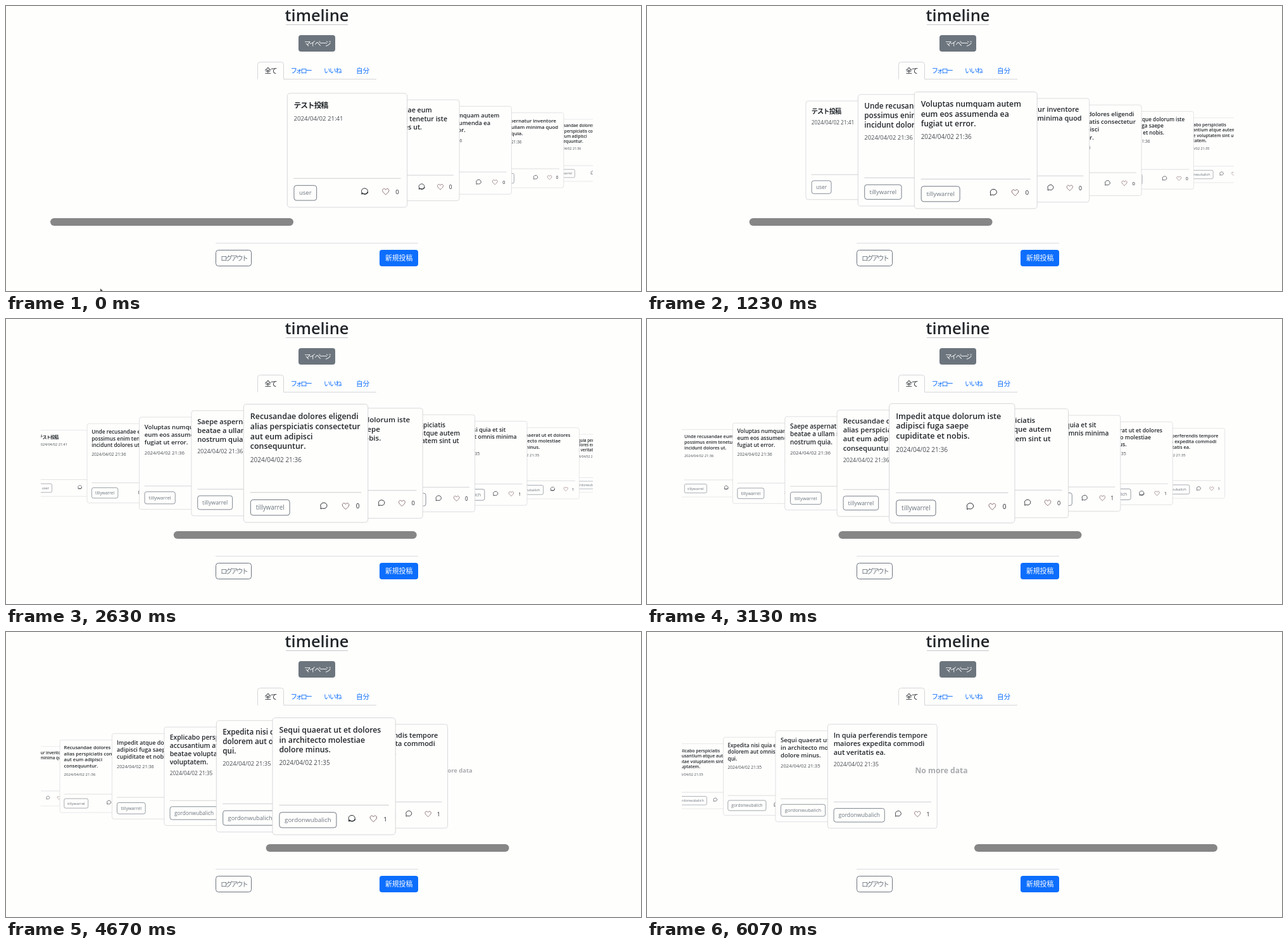
An HTML page with a canvas for the animation above (6110 ms loop, 1003 by 450 pixels).

```html
<!DOCTYPE html>
<html lang="ja">
<head>
<meta charset="utf-8">
<title>timeline</title>
<style>
html, body { margin: 0; width: 100%; height: 100%; overflow: hidden; background: #fefefd; }
canvas { display: block; width: 1003px; height: 450px; }
</style>
</head>
<body>
<canvas id="stage"></canvas>
<script>
const W = 1003, H = 450, LOOP = 6110, STEP = 100 / 3, LAST_STEP = 182;
const VIEW = { left: 55, right: 927, mid: 491, y: 227.8 };
const CARD = { w: 201.5, h: 191.5, gap: 93.2, shrink: 0.001155 };
const BG = '#fefefd', INK = '#212529', GRAY = '#6c757d', LINE = '#d6d6d8', BLUE = '#0d6efd';
const LATIN = '"Open Sans", "Noto Sans CJK JP", "Noto Sans CJK", sans-serif';
const KANA = '"Noto Sans CJK JP", "Noto Sans CJK", sans-serif';

// [time in ms, left edge of the scroll thumb]
const DRAG = [[0, 70], [1230, 161.6], [2130, 227], [3130, 302.5], [3670, 340.8], [4670, 410.6], [6070, 517]];
const SCROLL_RATIO = 2.2505;

const A = 'tillywarrel', B = 'gordonwubalich';
const post = (title, user, minute, likes, replies) =>
  ({ lines: title.split('|'), user, date: '2024/04/02 21:' + minute, likes, replies });
const posts = [
  post('テスト投稿', 'user', 41, 0, true),
  post('Unde recusandae eum|possimus enim tenetur iste|incidunt dolores ut.', A, 36, 0, true),
  post('Voluptas numquam autem|eum eos assumenda ea|fugiat ut error.', A, 36, 0),
  post('Saepe aspernatur inventore|beatae a ullam minima quod|nostrum quia.', A, 36, 0),
  post('Recusandae dolores eligendi|alias perspiciatis consectetur|aut eum adipisci|consequuntur.', A, 36, 0),
  post('Impedit atque dolorum iste|adipisci fuga saepe|cupiditate et nobis.', A, 36, 0),
  post('Explicabo perspiciatis|accusantium atque autem|beatae voluptatem sint ut|voluptatem.', B, 35, 0),
  post('Expedita nisi quia et sit|dolorem aut omnis minima|qui.', B, 35, 1),
  post('Sequi quaerat ut et dolores|in architecto molestiae|dolore minus.', B, 35, 1, true),
  post('In quia perferendis tempore|maiores expedita commodi|aut veritatis ea.', B, 35, 1),
  null // end marker
];

const canvas = document.getElementById('stage');
const ctx = canvas.getContext('2d');
const dpr = window.devicePixelRatio || 1;
canvas.width = W * dpr;
canvas.height = H * dpr;

function text(str, x, y, font, color, align = 'left', spacing = 0) {
  ctx.font = font;
  ctx.fillStyle = color;
  ctx.textAlign = align;
  ctx.letterSpacing = spacing + 'px';
  ctx.fillText(str, x, y);
  ctx.letterSpacing = '0px';
}

function box(x, y, w, h, r, fill, stroke) {
  ctx.beginPath();
  ctx.roundRect(x, y, w, h, r);
  if (fill) { ctx.fillStyle = fill; ctx.fill(); }
  if (stroke) { ctx.strokeStyle = stroke; ctx.lineWidth = 1; ctx.stroke(); }
}

function rule(x1, x2, y, color) {
  ctx.strokeStyle = color;
  ctx.lineWidth = 1;
  ctx.beginPath();
  ctx.moveTo(x1, y);
  ctx.lineTo(x2, y);
  ctx.stroke();
}

function chatIcon(x, y, replies) {
  const rad = Math.PI / 180;
  ctx.strokeStyle = INK;
  ctx.lineWidth = 1;
  ctx.beginPath();
  ctx.ellipse(x, y, 5.2, 4.7, 0, 155 * rad, 475 * rad);
  ctx.lineTo(x - 5, y + 5.2);
  ctx.closePath();
  ctx.stroke();
  if (!replies) return;
  ctx.lineWidth = 1.3;
  ctx.beginPath();
  ctx.ellipse(x + 0.4, y + 0.6, 5.4, 4.4, 0, 10 * rad, 150 * rad);
  ctx.stroke();
}

function heartIcon(x, y) {
  ctx.strokeStyle = '#86686a';
  ctx.lineWidth = 1;
  ctx.beginPath();
  for (const side of [-1, 1]) {
    ctx.moveTo(x, y - 2.8);
    ctx.bezierCurveTo(x + side * 1.5, y - 6, x + side * 5.6, y - 5, x + side * 5.4, y - 1.6);
    ctx.bezierCurveTo(x + side * 5.2, y + 1.2, x + side * 2, y + 3.2, x, y + 5.2);
  }
  ctx.stroke();
}

function drawCard(p) {
  const left = -89.5, small = '10.1px ' + LATIN;
  box(-CARD.w / 2 + 0.5, -CARD.h / 2 + 0.5, CARD.w - 1, CARD.h - 1, 4.5, BG, LINE);
  const japanese = p.user === 'user';
  const font = japanese ? '700 12.4px ' + KANA : '600 12.7px ' + LATIN;
  p.lines.forEach((line, i) => text(line, left, -71 + i * 16, font, INK, 'left', japanese ? -1 : 0));
  text(p.date, left, -66 + p.lines.length * 16, '10.2px ' + LATIN, '#484c50');
  rule(left, 89.5, 47, '#c9cacc');
  ctx.font = small;
  const width = ctx.measureText(p.user).width + 17;
  box(left + 0.5, 58.8, width, 25, 4, null, GRAY);
  text(p.user, left + 9, 74.8, small, GRAY);
  chatIcon(29, 68.3, p.replies);
  heartIcon(64.3, 69);
  text(String(p.likes), 83.7, 73, small, INK, 'center');
}

function drawCarousel(thumb) {
  const first = 539 - (thumb - DRAG[0][1]) * SCROLL_RATIO;
  const items = posts.map((p, i) => ({ p, x: first + i * CARD.gap }));
  const dist = item => Math.abs(item.x - VIEW.mid);
  items.sort((a, b) => dist(b) - dist(a));
  ctx.save();
  ctx.beginPath();
  ctx.rect(VIEW.left, 125, VIEW.right - VIEW.left, 205);
  ctx.clip();
  for (const item of items) {
    const s = 1 - dist(item) * CARD.shrink;
    if (s < 0.35) continue;
    ctx.save();
    ctx.translate(item.x, item.p ? VIEW.y : 219);
    ctx.scale(s, s);
    if (item.p) drawCard(item.p);
    else text('No more data', 0, 4.4, '700 12.5px ' + LATIN, '#a9abae', 'center');
    ctx.restore();
  }
  ctx.restore();
}

function drawPage() {
  text('timeline', 491, 24, '600 25.4px ' + LATIN, INK, 'center');
  rule(442, 540, 29.5, '#c6c7c9');

  box(462, 46, 58, 26, 4, GRAY);
  text('マイページ', 471, 62.6, '500 10.4px ' + KANA, '#fff', 'left', -2.3);

  ctx.strokeStyle = LINE;
  ctx.lineWidth = 1;
  ctx.beginPath();
  ctx.moveTo(397.5, 115.5);
  ctx.lineTo(397.5, 92.5);
  ctx.arcTo(397.5, 88.5, 401.5, 88.5, 4);
  ctx.lineTo(434.5, 88.5);
  ctx.arcTo(438.5, 88.5, 438.5, 92.5, 4);
  ctx.lineTo(438.5, 115.5);
  ctx.lineTo(585, 115.5);
  ctx.stroke();
  const tab = '10.6px ' + KANA;
  text('全て', 408.5, 106, tab, INK, 'left', -1);
  text('フォロー', 449.5, 106, tab, BLUE, 'left', -2.7);
  text('いいね', 502, 106, tab, BLUE, 'left', -1.5);
  text('自分', 553, 106, tab, BLUE);

  rule(331, 651, 374.5, '#dcdcde');
  box(331.5, 385.5, 56, 25, 4, null, GRAY);
  text('ログアウト', 339, 402, tab, GRAY, 'left', -2.3);
  box(590, 385, 61, 26, 4, BLUE);
  text('新規投稿', 599, 402, '500 10.8px ' + KANA, '#fff');
}

function drawPointer() {
  ctx.fillStyle = '#444';
  ctx.beginPath();
  ctx.moveTo(149, 446);
  ctx.lineTo(153, 450);
  ctx.lineTo(149, 450);
  ctx.fill();
}

function thumbAt(t) {
  let i = 1;
  while (i < DRAG.length - 1 && t > DRAG[i][0]) i++;
  const [t0, x0] = DRAG[i - 1], [t1, x1] = DRAG[i];
  return x0 + (x1 - x0) * Math.min(1, (t - t0) / (t1 - t0));
}

// The motion advances in thirtieths of a second, rounded to 10 ms.
const stepTime = k => Math.round(k * STEP / 10) * 10;
function currentStep(t) {
  let k = Math.floor(t / STEP) + 1;
  while (stepTime(k) > t) k--;
  return Math.min(k, LAST_STEP);
}

function draw(now) {
  const k = currentStep(now % LOOP);
  const thumb = thumbAt(stepTime(k));
  ctx.setTransform(dpr, 0, 0, dpr, 0, 0);
  ctx.fillStyle = BG;
  ctx.fillRect(0, 0, W, H);
  drawPage();
  drawCarousel(thumb);
  box(thumb, 335, 384, 12, 6, '#868686');
  if (k === 0) drawPointer();
}

const start = performance.now();
function tick() {
  draw(Math.max(0, performance.now() - start));
  requestAnimationFrame(tick);
}
tick();
</script>
</body>
</html>
```
